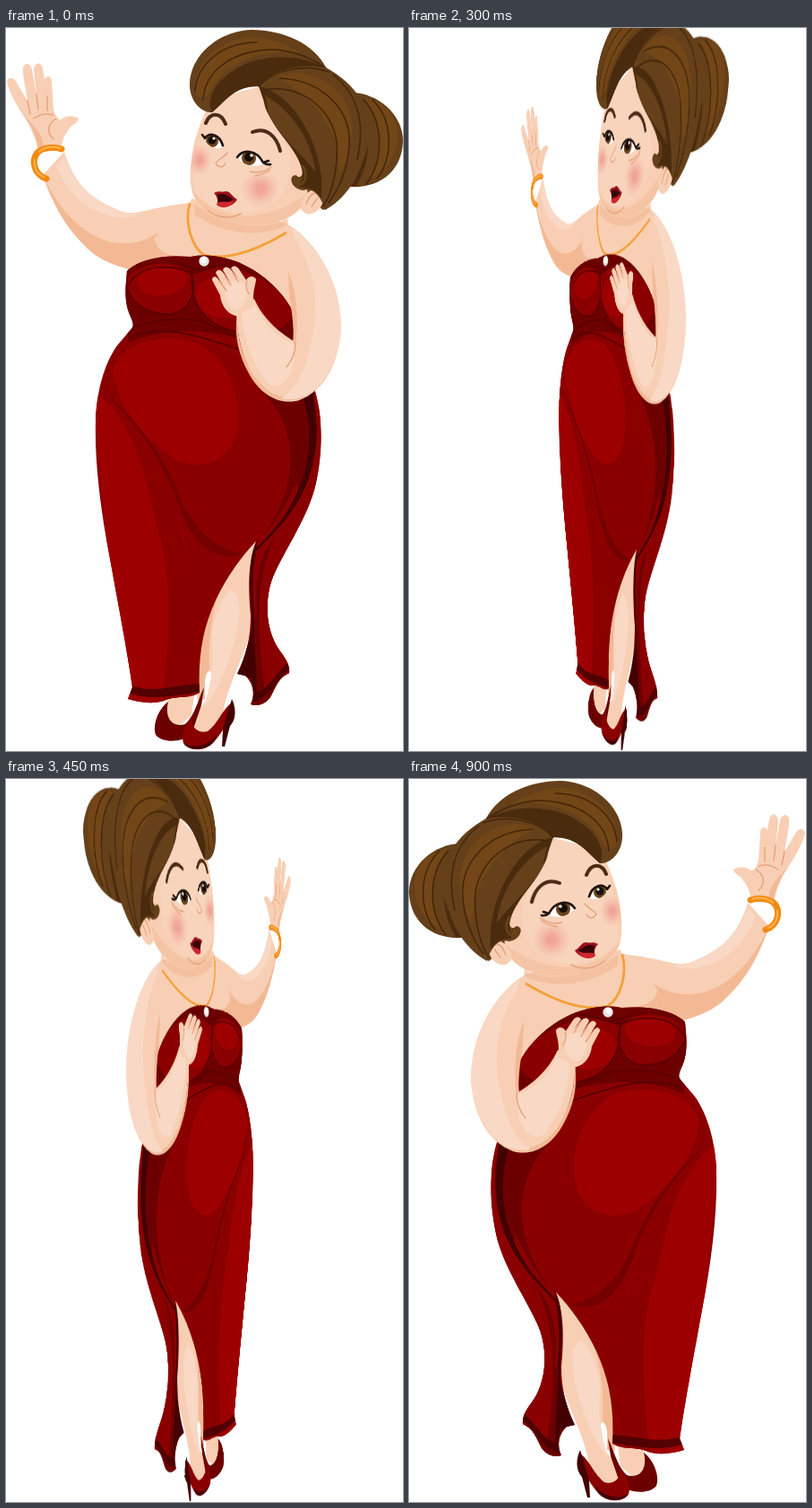
Animation, 443 px wide and 806 px high, one loop 1.05 s. Source, as an HTML page:

```html
<!DOCTYPE html>
<html lang="en">
<head>
<meta charset="utf-8">
<title>Turning lady</title>
<style>
html, body { margin: 0; width: 100%; height: 100%; overflow: hidden; background: #fff; }
svg { display: block; width: 443px; height: 806px; overflow: visible; transform-origin: 50% 50%; }
.skin { fill: #f8cfb4; }
.light { fill: #f9d9c5; }
.shade { fill: #f3b995; }
.hair { fill: #65401a; }
.gloss { fill: #734617; }
.dark { fill: #4b2b0e; }
.dress { fill: #8a0000; }
.bright { fill: #9d0000; }
.fold { fill: #6c0000; }
.deep { fill: #430003; }
.line { fill: none; stroke-linecap: round; stroke-linejoin: round; }
.strand { stroke: #432509; stroke-width: 1.5; }
.seam { stroke: #5d0000; stroke-width: 2; }
.crease { stroke: #e5a27b; stroke-width: 1.4; }
.brow { stroke: #4c2c14; stroke-width: 4; }
.lash { stroke: #20120c; stroke-width: 2.6; }
.gold { stroke: #f4a13a; stroke-width: 2.8; }
.band { stroke: #f48a12; stroke-width: 7; }
</style>
</head>
<body>
<svg id="lady" viewBox="0 0 443 806">
  <defs>
    <radialGradient id="blush">
      <stop offset=".2" stop-color="#f0a093" stop-opacity=".9"/>
      <stop offset="1" stop-color="#f5b8a2" stop-opacity="0"/>
    </radialGradient>
    <clipPath id="gown"><path id="gownShape" d="M135 271C150 256 180 253 206 255C252 246 303 279 322 320L320 352L344 402C354 430 354 478 344 515C333 553 307 587 296 617C288 643 291 672 304 692C312 703 317 710 316 719C304 724 301 735 295 746C288 755 280 756 273 754C279 742 275 729 267 722L258 720C268 699 273 680 273 655C270 625 270 596 279 572C253 600 229 637 220 680C216 700 215 720 216 741C203 749 191 743 176 750C163 754 150 752 136 748L141 735C136 698 123 630 112 570C105 530 99 483 100 440C101 404 110 374 124 354L141 334C144 328 137 321 135 310C132 297 134 284 135 271Z"/></clipPath>
    <clipPath id="face"><path id="faceShape" d="M228 80C221 98 211 117 208 140C204 165 205 181 212 192C225 211 247 218 270 219C300 222 326 211 336 190L338 145L302 60Z"/></clipPath>
    <clipPath id="eyes"><path id="eyeShape" d="M222 125C226 117 238 118 242 132C236 136 227 134 222 125ZM259 145C264 136 280 136 288 151C279 156 265 154 259 145Z"/></clipPath>
  </defs>

  <g id="legs">
    <path class="skin" d="M279 570C252 600 222 642 215 686L213 750L222 748C222 735 220 719 227 717C233 721 231 733 229 742C219 755 211 765 207 779L222 793L242 765C246 735 264 705 276 665L284 600Z"/>
    <path class="shade" d="M230 640C219 674 216 708 215 749L222 748C221 731 222 718 227 716C226 690 227 667 236 632Z"/>
    <path class="light" d="M250 626C235 644 229 667 230 684C232 704 230 728 221 756C236 742 248 710 257 676C263 650 262 629 250 626Z"/>
    <path class="skin" d="M181 746L210 744L207 766L190 781L176 776Z"/>
    <path class="fold" d="M181 751C170 759 163 777 167 788C176 799 200 795 207 787L218 755L221 735C215 747 211 766 200 776C188 780 176 772 181 751Z"/>
    <path class="dress" d="M208 766C200 778 194 791 199 799C207 807 223 806 232 796C242 785 250 770 252 752C241 760 237 775 225 784C214 787 205 779 208 766Z"/>
    <path class="deep" d="M252 748C257 758 257 771 250 778L244 801L241 801L242 782ZM198 797C207 803 225 802 235 788C231 807 205 808 198 797Z"/>
  </g>

  <g id="raisedArm">
    <path class="skin" d="M41 164C54 204 76 239 106 255C122 264 136 267 148 273L215 258L213 194C195 196 174 199 159 203C142 207 134 208 121 201C94 190 75 172 65 138Z"/>
    <path class="shade" d="M42 166C59 203 85 229 114 238C138 243 153 239 172 227C160 246 154 263 148 272C125 266 104 260 88 243C66 221 52 195 42 166Z"/>
    <path class="light" d="M56 153C66 178 83 198 108 207C124 213 139 213 153 207C134 209 122 204 109 195C87 183 74 168 65 144Z"/>
    <path class="skin" d="M36 139C35 126 27 109 19 97C10 83 3 70 1 60C3 53 10 55 13 63L24 81C22 66 18 52 19 44C21 38 27 39 29 46L34 74L31 47C32 38 39 37 41 45L46 76L43 58C45 52 51 53 51 60L53 91C56 100 59 104 63 101C69 97 76 98 81 101C80 106 75 107 72 110C68 118 62 121 62 136Z"/>
    <path class="shade" d="M20 97C28 107 37 113 41 126L42 138L36 139C36 124 28 109 20 97Z"/>
    <path class="line crease" d="M24 81L27 96M34 74L36 91M46 76L46 92M31 101C38 96 46 95 52 97M56 101C46 107 45 117 53 124"/>
    <path class="line band" d="M62 135C53 132 41 133 35 139C28 148 31 163 45 168"/>
    <path class="line" stroke="#ffb34d" stroke-width="2" d="M60 134C52 131 42 133 37 138M32 147C31 156 35 163 42 166"/>
  </g>

  <g id="torso">
    <path class="skin" d="M207 190C202 211 190 211 176 222C160 238 154 260 146 274L210 290L324 340L342 405L370 350C378 290 348 238 313 218Z"/>
    <path class="shade" d="M166 235C157 246 151 262 147 273C165 258 183 257 205 258C184 252 168 252 166 235Z"/>
    <path class="shade" d="M210 195C236 219 286 229 314 212L315 219C284 236 240 229 210 208Z" opacity=".65"/>
    <path class="line gold" d="M205 196C199 217 207 244 221 253C250 261 286 244 313 228"/>
  </g>

  <g id="dress">
    <use href="#gownShape" class="dress"/>
    <g clip-path="url(#gown)">
      <path class="fold" d="M130 240H330V350C281 358 237 333 184 339C162 341 149 346 136 351Z"/>
      <path class="dress" d="M137 276C157 258 190 259 206 273C214 301 202 317 180 319C151 319 131 300 137 276ZM208 276C238 254 304 276 321 317C315 338 286 343 254 338C220 331 205 303 208 276Z"/>
      <ellipse class="bright" cx="174" cy="281" rx="28" ry="17" transform="rotate(-7 174 281)"/>
      <ellipse class="bright" cx="239" cy="301" rx="27" ry="22" transform="rotate(19 239 301)"/>
      <path class="fold" d="M344 392C344 460 334 518 301 566C282 588 277 617 280 651L260 721L272 760L325 750V390Z"/>
      <path class="dress" d="M350 420C344 481 329 526 302 564C280 605 278 659 289 739L319 719L291 651L364 480Z"/>
      <path class="bright" d="M119 382C127 350 177 339 213 351C250 371 266 418 256 455C247 482 220 493 193 483C156 460 126 427 119 382Z"/>
      <path class="bright" d="M96 404C126 425 139 448 150 475C163 510 190 535 200 575C211 624 204 684 190 755H130Z"/>
      <path class="dress" d="M106 413C156 454 157 527 173 570C187 631 181 689 174 754L204 747C218 669 213 600 187 541C172 496 147 449 106 413Z"/>
      <path class="fold" d="M104 400C139 430 172 468 191 515C207 560 239 584 266 586C232 598 207 574 193 533C175 480 143 438 104 400Z" opacity=".75"/>
      <path class="fold" d="M278 398C326 439 332 502 285 570C329 515 349 456 342 403Z"/>
      <path class="deep" d="M330 407C345 451 340 499 311 543C294 568 267 590 249 613C276 584 319 552 337 505C350 468 348 434 342 407ZM274 586C267 640 284 668 264 699L257 723L274 724L279 752C282 720 275 690 277 651C275 625 274 607 281 569Z"/>
      <path class="deep" d="M140 733C165 742 191 732 217 731V740C188 744 165 750 138 742ZM272 742C290 742 299 722 314 708L317 715C302 725 294 748 275 751Z" opacity=".8"/>
      <path class="line seam" d="M137 286C149 264 184 262 206 273C222 272 236 263 252 263M206 273C216 294 202 319 180 319C160 319 143 309 137 294M208 276C204 309 225 332 255 338M195 263L212 269L226 262M142 334C170 324 195 323 214 326C229 331 246 337 262 348M139 344C171 332 202 338 259 358M216 323L235 337"/>
    </g>
  </g>

  <g id="restingArm">
    <path class="skin" d="M313 250C313 287 323 313 323 350C309 342 288 327 277 302L257 318C258 344 264 367 275 387C286 410 306 421 327 415C355 404 369 378 373 343C378 290 348 238 313 219Z"/>
    <path class="shade" d="M315 270C327 301 328 344 318 379C323 356 321 323 316 299ZM258 319C257 350 269 385 290 402C302 412 321 416 340 409C310 423 287 413 272 387C260 366 254 343 258 319Z"/>
    <path class="light" d="M322 234C345 269 351 314 340 351C334 382 326 400 307 413C340 421 370 384 374 338C376 294 350 244 320 224Z"/>
    <path class="light" d="M263 318C265 348 277 379 294 398C312 403 324 384 322 352C298 344 283 323 277 306Z"/>
    <path class="skin" d="M257 321C247 319 240 309 239 298L230 281C230 276 235 276 238 282L242 287L234 273C236 268 240 269 244 275L250 283L242 270C244 264 249 266 253 272L259 279L251 268C254 263 259 266 262 272L268 281C271 277 275 275 279 280C279 285 276 290 276 302L278 309Z"/>
    <path class="light" d="M245 288C252 281 264 281 269 288C271 301 265 313 255 315C247 309 243 299 245 288Z"/>
    <path class="line crease" d="M238 282L246 293M244 276L251 287M253 273L259 283M269 282C267 287 268 292 271 296M323 351C323 361 319 371 313 378"/>
  </g>
  <circle cx="221" cy="260" r="5.7" fill="#e7e5e1"/><circle cx="220" cy="258.5" r="3.5" fill="#fff"/>

  <g id="backHair">
    <path class="hair" d="M382 72C411 70 443 94 443 126C442 158 419 179 383 177L348 114Z"/>
    <path class="gloss" d="M400 78C431 82 444 111 434 138C428 154 416 164 407 167C421 136 421 104 400 78Z"/>
    <path class="dark" d="M378 80C405 97 414 135 391 176L366 178Z"/>
    <path class="line strand" d="M399 80C422 105 422 147 402 174M409 80C433 104 432 144 414 168"/>
    <path class="hair" d="M283 63C296 37 340 34 368 51C399 71 414 107 402 138C392 168 375 192 354 203L326 181L317 120Z"/>
  </g>

  <g id="head">
    <use href="#faceShape" class="skin"/>
    <g clip-path="url(#face)">
      <path class="shade" d="M207 180C230 212 282 224 335 185L330 222H210Z" opacity=".5"/>
      <path class="light" d="M232 82C216 117 208 145 210 176C216 198 249 208 271 205C302 202 323 178 315 134L278 65Z" opacity=".55"/>
      <circle cx="284" cy="179" r="22" fill="url(#blush)"/>
      <ellipse cx="216" cy="147" rx="14" ry="18" fill="url(#blush)"/>
    </g>
    <path class="skin" d="M332 190C338 178 351 176 354 186C356 200 344 209 335 207C326 202 327 196 332 190Z"/>
    <path class="line crease" d="M335 196C340 183 347 181 349 188M341 199C344 195 346 193 347 190M225 203C238 213 250 213 262 207"/>
    <path class="line brow" d="M223 106C227 95 239 92 245 107M275 116C291 110 302 121 306 137"/>
    <use href="#eyeShape" fill="#fff"/>
    <g clip-path="url(#eyes)">
      <circle cx="230" cy="126" r="7" fill="#6c431c"/><circle cx="271" cy="145" r="8" fill="#6c431c"/>
      <circle cx="230" cy="125" r="4.5" fill="#160d09"/><circle cx="271" cy="144" r="5" fill="#160d09"/>
      <circle cx="232" cy="123" r="1.6" fill="#fff"/><circle cx="274" cy="142" r="1.8" fill="#fff"/>
    </g>
    <path class="line lash" d="M219 119L222 123C227 116 238 118 242 131M258 144C264 135 279 135 287 150C290 152 292 153 295 152M287 150L293 148"/>
    <path class="line crease" d="M247 139C243 145 235 147 234 151C236 155 242 157 245 151M272 160C280 162 290 160 296 155M278 165C285 163 291 161 295 158"/>
    <path fill="#9c111a" d="M232 184C238 180 241 184 245 182C251 182 253 189 258 191C254 199 242 202 235 197C237 193 236 188 232 184Z"/>
    <path fill="#35060b" d="M236 186C243 183 249 188 254 191C249 195 242 195 237 195Z"/>
    <path fill="#d2252c" d="M236 195C242 192 249 196 255 192C251 200 242 202 236 198Z"/>
  </g>

  <g id="frontHair">
    <path class="hair" d="M282 65C254 65 246 81 230 94C215 94 204 78 205 61C207 28 239 3 274 2C310 2 344 18 357 44C387 61 405 89 402 122C401 157 383 188 356 203C352 189 344 177 331 181C320 179 315 170 322 164C328 169 333 164 330 157C325 136 303 118 291 93C285 81 290 72 282 65Z"/>
    <path class="dark" d="M230 94C221 77 238 51 272 38C300 29 331 31 356 44C327 39 298 46 282 65C256 64 246 80 230 94Z"/>
    <path class="gloss" d="M211 65C213 37 239 13 273 10C294 10 313 18 327 27C291 23 247 35 229 68C222 82 210 81 211 65Z"/>
    <path class="gloss" d="M302 55C326 43 361 55 376 79C392 103 388 137 372 164C374 128 357 84 302 55Z"/>
    <path class="dark" d="M282 65C297 68 312 78 325 96C345 124 355 159 352 190C342 174 334 181 326 176C339 162 324 139 309 121C292 100 289 84 282 65Z"/>
    <path class="hair" d="M289 75C318 91 342 126 345 160C329 139 306 121 294 98Z"/>
    <path class="line strand" d="M211 70C214 38 243 16 280 16M220 80C222 47 253 25 297 24C320 25 340 33 356 44M282 65C300 45 335 40 360 49M289 69C327 61 365 90 369 128C371 156 364 184 354 199M305 56C354 58 386 92 383 132C381 158 371 180 360 195M365 52C393 74 401 107 392 146"/>
    <path class="line" stroke="#65401a" stroke-width="3" d="M331 154C339 165 331 180 322 173C318 169 320 165 324 166"/>
  </g>
</svg>
<script>
// Each pose: start time (ms), facing (1 left, -1 right), turn (degrees), viewing distance (px).
const poses = [
  [0, 1, 0, 900], [150, 1, 40, 828], [300, 1, 60, 955],
  [450, -1, 60, 955], [600, -1, 40, 828], [900, -1, 0, 900]
];
const loop = 1050;
const axis = '.026, 1, 0'; // leans slightly off the vertical
const lady = document.getElementById('lady');
const start = performance.now();

function draw(now) {
  const time = Math.max(0, now - start) % loop;
  const [, facing, turn, distance] = poses.findLast(([from]) => from <= time);
  lady.style.transform =
    `scaleX(${facing}) perspective(${distance}px) rotate3d(${axis}, ${-turn}deg)`;
  requestAnimationFrame(draw);
}
draw(start);
</script>
</body>
</html>
```
